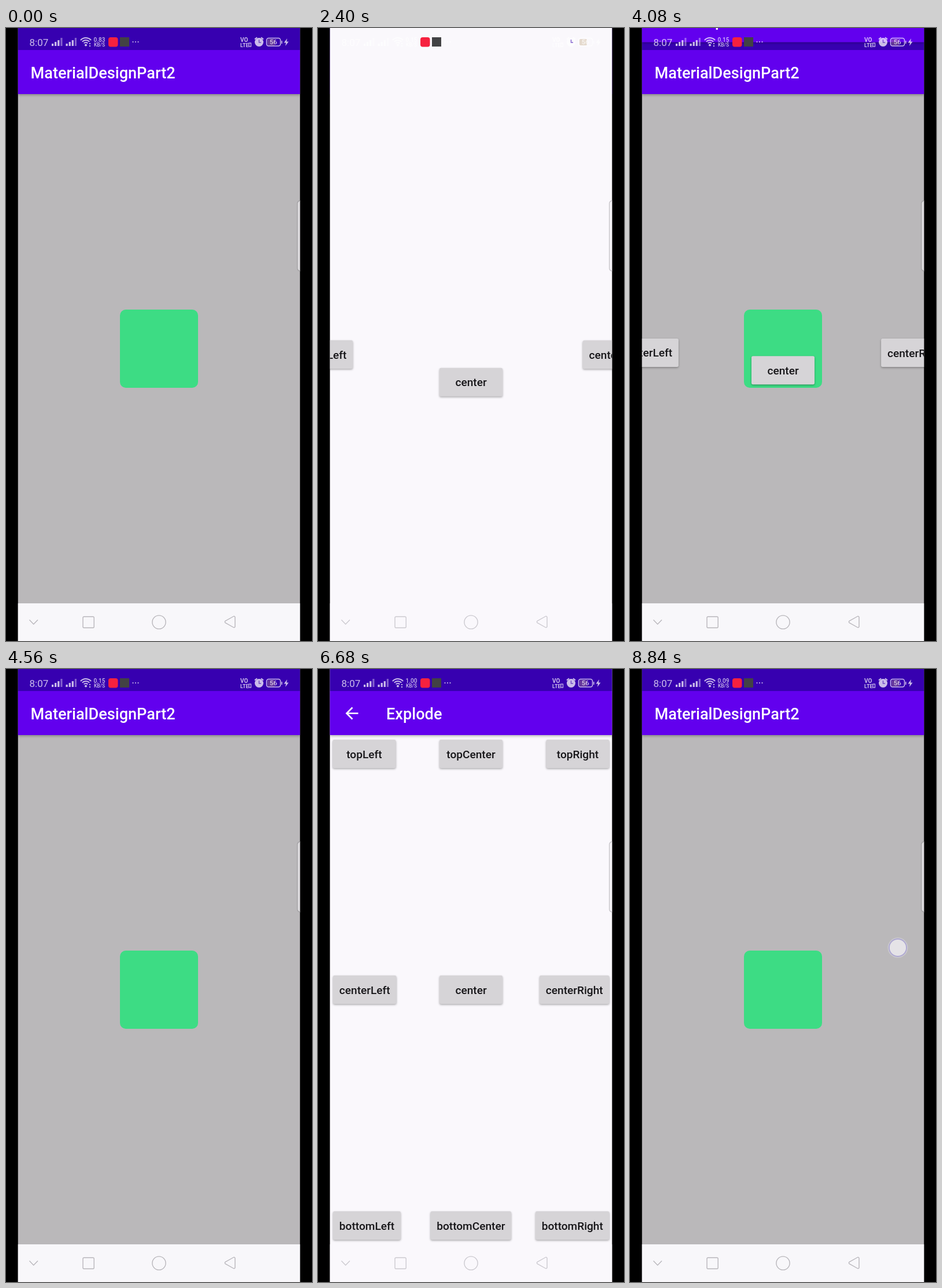
An HTML page with a canvas for the animation above (8.88 s loop, 529 by 1058 pixels).

```html
<!DOCTYPE html>
<html lang="en">
<head>
<meta charset="utf-8">
<title>Explode transition</title>
<style>
  html, body { margin: 0; width: 100%; height: 100%; overflow: hidden; background: #000; }
  canvas { display: block; width: 100vw; height: 100vh; }
</style>
</head>
<body>
<canvas id="stage" width="529" height="1058"></canvas>
<script>
const ctx = document.getElementById('stage').getContext('2d');
const W = 529, H = 1058, LOOP = 8880, STEP = 40;
const LEFT = 20.5, RIGHT = 508.5, BAR = 114, NAV = 993;
const CX = 264.5, CY = H / 2;
const PAPER = '#faf8fc', PURPLE = '#6200ee', DEEP = '#3700b0';
const SANS = 'Roboto, sans-serif';

// Explode: every part travels REACH away from the centre, delayed by its distance.
const DURATION = 740;
const REACH = Math.hypot(RIGHT - LEFT, H) / 2;
const LAST_DELAY = 0.146;
const visits = [{ enter: 1888, leave: 3790 }, { enter: 5535, leave: 7710 }];

const taps = [
  { from: 1520, to: 1640, x: 463, y: 481 },
  { from: 3720, to: 3820, x: 392, y: 1025, back: true },
  { from: 5240, to: 5360, x: 463, y: 481 },
  { from: 7640, to: 7740, x: 392, y: 1025, back: true },
  { from: 8800, to: LOOP, x: 463, y: 481 }
];

const button = (label, x, y, w) => {
  const dx = x + w / 2 - CX, dy = y + 24.5 - CY, dist = Math.hypot(dx, dy);
  return { label, x, y, w, ux: dx / dist, uy: dy / dist, delay: dist / (REACH * 2) / 3 };
};
const buttons = [
  button('topLeft', 25.5, 122, 109),
  button('topCenter', 210, 122, 109),
  button('topRight', 394.5, 122, 109),
  button('centerLeft', 26, 529, 109.5),
  button('center', 210, 529, 109),
  button('centerRight', 383, 529, 120.5),
  button('bottomLeft', 26, 936, 117),
  button('bottomCenter', 194.5, 936, 139.5),
  button('bottomRight', 376, 936, 127.5)
];

const clamp = v => Math.max(0, Math.min(1, v));
const smooth = v => (1 - Math.cos(Math.PI * clamp(v))) / 2;

function rect(x, y, w, h, color) {
  ctx.fillStyle = color;
  ctx.fillRect(x, y, w, h);
}

function roundPath(x, y, w, h, r) {
  ctx.beginPath();
  ctx.roundRect(x, y, w, h, r);
}

function rounded(x, y, w, h, r, color) {
  roundPath(x, y, w, h, r);
  ctx.fillStyle = color;
  ctx.fill();
}

function disc(x, y, r, color) {
  ctx.beginPath();
  ctx.arc(x, y, r, 0, Math.PI * 2);
  ctx.fillStyle = color;
  ctx.fill();
}

function polyline(points, close) {
  ctx.beginPath();
  points.forEach(([x, y]) => ctx.lineTo(x, y));
  if (close) ctx.closePath();
}

function text(str, x, y, size, color, weight = 500, align = 'left') {
  ctx.font = `${weight} ${size}px ${SANS}`;
  ctx.textAlign = align;
  ctx.fillStyle = color;
  ctx.fillText(str, x, y);
}

function shadowed(blur, dy, alpha, draw) {
  ctx.save();
  ctx.shadowColor = `rgba(0,0,0,${alpha})`;
  ctx.shadowBlur = blur;
  ctx.shadowOffsetY = dy;
  draw();
  ctx.restore();
}

function clipped(x, y, w, h, draw) {
  ctx.save();
  ctx.beginPath();
  ctx.rect(x, y, w, h);
  ctx.clip();
  draw();
  ctx.restore();
}

function appBar(y) {
  shadowed(4, 1.5, 0.28, () => rect(LEFT, y + 38, RIGHT - LEFT, BAR - 38, PURPLE));
  rect(LEFT, y, RIGHT - LEFT, 38, DEEP);
}

function drawMain() {
  rect(LEFT, 0, RIGHT - LEFT, H, '#bab8ba');
  appBar(0);
  text('MaterialDesignPart2', 42.5, 86.5, 27.1, '#fff');
  rounded(197, 486, 135, 135, 10, '#3ddc84');
  rect(LEFT, NAV, RIGHT - LEFT, H - NAV, '#f8f7fa');
}

function offset(visit, delay, t) {
  if (t < visit.leave) {
    const u = clamp((t - visit.enter) / DURATION - delay);
    return REACH * (1 - u) ** 2;
  }
  const u = clamp((t - visit.leave) / DURATION - (LAST_DELAY - delay));
  return REACH * u ** 2;
}

function coverage(visit, t) {
  return t < visit.leave
    ? smooth((t - visit.enter - 22) / 225)
    : 1 - smooth((t - visit.leave) / 220);
}

function drawButton(b, d) {
  const x = b.x + b.ux * d, y = b.y + b.uy * d;
  shadowed(3.5, 1.5, 0.32, () => rounded(x, y, b.w, 49, 2.7, '#d6d4d7'));
  text(b.label, x + b.w / 2, y + 31.5, 19.1, '#161518', 500, 'center');
}

function drawExplode(visit, t) {
  ctx.globalAlpha = coverage(visit, t);
  rect(LEFT, 0, RIGHT - LEFT, H, PAPER);
  ctx.globalAlpha = 1;

  clipped(LEFT, BAR, RIGHT - LEFT, NAV - BAR, () =>
    buttons.forEach(b => drawButton(b, offset(visit, b.delay, t))));

  const y = -offset(visit, LAST_DELAY, t);
  appBar(y);
  ctx.strokeStyle = '#fff';
  ctx.lineWidth = 2.7;
  polyline([[69.5, y + 76.5], [50, y + 76.5]]);
  ctx.stroke();
  polyline([[59.5, y + 66.5], [49.5, y + 76.5], [59.5, y + 86.5]]);
  ctx.stroke();
  text('Explode', 118, y + 86.5, 27.1, '#fff');
}

function drawSignal(x, ink) {
  [4, 7, 10, 14].forEach((h, i) => {
    ctx.globalAlpha = i < 3 ? 1 : 0.5;
    rect(x + i * 5.1, 31 - h, 3.2, h, ink);
  });
  ctx.globalAlpha = 1;
}

function drawStatus(t) {
  const ink = 'rgba(255,255,255,0.74)';
  const speed = t < 1960 ? '0.83' : t < 5260 ? '0.15' : t < 8560 ? '1.00' : '0.09';
  text('8:07', 40.5, 30.5, 17, ink, 400);
  drawSignal(79, ink);
  drawSignal(103.5, ink);

  ctx.strokeStyle = ink;
  ctx.lineWidth = 2;
  [4.5, 8.5, 12.5].forEach(r => {
    ctx.beginPath();
    ctx.arc(138, 29.5, r, -Math.PI * 0.76, -Math.PI * 0.24);
    ctx.stroke();
  });
  disc(138, 29.5, 2, ink);
  rect(144, 26, 2, 2, ink);
  rect(144, 30, 2, 2, ink);

  text(speed, 161.5, 23.5, 10, ink, 500, 'center');
  text('KB/S', 161.5, 31.5, 8.5, ink, 500, 'center');
  rounded(177, 16, 16.5, 16.5, 4, '#f6213f');
  rect(197, 16, 16, 16, '#424244');
  [219.5, 224, 228.5].forEach(x => disc(x, 24, 1.1, ink));

  text('VO', 405, 23.5, 10, ink, 700);
  text('LTE', 405, 32.5, 9, ink, 700);
  ctx.lineWidth = 1.2;
  ctx.strokeRect(420, 26, 3.5, 6);

  disc(437.5, 24.5, 7.5, ink);
  ctx.lineWidth = 2;
  polyline([[430, 19.5], [434, 16.2]]);
  ctx.stroke();
  polyline([[445, 19.5], [441, 16.2]]);
  ctx.stroke();
  ctx.strokeStyle = 'rgba(55,0,176,0.6)';
  ctx.lineWidth = 1.5;
  polyline([[437.5, 20], [437.5, 25], [441, 25]]);
  ctx.stroke();

  ctx.strokeStyle = ink;
  rounded(452, 19, 13, 11, 2, 'rgba(190,160,120,0.35)');
  roundPath(450.5, 17.5, 24, 13.5, 3.5);
  ctx.stroke();
  rect(476, 22, 1.5, 5, ink);
  text('56', 462.3, 28.4, 11.5, ink, 500, 'center');
  polyline([[486, 18], [480.5, 25.5], [484, 25.5], [483, 31], [488.5, 23.5], [485, 23.5]], true);
  ctx.fillStyle = ink;
  ctx.fill();
}

function drawBackRipple(tap, t) {
  const fade = 1 - clamp((t - tap.to) / 200);
  if (t < tap.from || fade === 0) return;
  ctx.globalAlpha = fade;
  rounded(360, NAV, 53, H - NAV, 26, '#e6e5e8');
  ctx.globalAlpha = 1;
}

function drawNav(cover) {
  ctx.strokeStyle = cover > 0.6 ? '#cccad0' : '#b9b7bc';
  ctx.lineWidth = 1.4;
  ctx.lineJoin = 'round';
  polyline([[40.5, 1021.5], [47.7, 1029], [55, 1021.5]]);
  ctx.stroke();
  roundPath(133, 1016, 19.2, 19.2, 2);
  ctx.stroke();
  ctx.beginPath();
  ctx.arc(CX, 1025.5, 11.6, 0, Math.PI * 2);
  ctx.stroke();
  ctx.beginPath();
  ctx.moveTo(396, 1025);
  [[396, 1036], [376.5, 1025], [396, 1014], [396, 1025]].forEach(([x, y], i, all) => {
    const next = all[i + 1];
    if (next) ctx.arcTo(x, y, next[0], next[1], 1.8);
  });
  ctx.closePath();
  ctx.stroke();
  ctx.lineJoin = 'miter';
}

function drawHandle(cover) {
  clipped(LEFT, 290, RIGHT - LEFT, 140, () => {
    roundPath(503.7, 298, 14, 121.5, 5);
    ctx.fillStyle = cover > 0.5 ? '#f7f5f9' : '#dddbde';
    ctx.fill();
    ctx.strokeStyle = cover > 0.5 ? '#c6c4c8' : '#a19fa2';
    ctx.lineWidth = 1.3;
    ctx.stroke();
  });
}

function drawTap(tap, t) {
  const fade = 1 - clamp((t - tap.to) / 80);
  if (t < tap.from || fade === 0) return;
  ctx.globalAlpha = fade;
  disc(tap.x, tap.y, 17.5, 'rgba(225,222,235,0.4)');
  disc(tap.x, tap.y, 15, tap.back ? 'rgba(240,239,243,0.75)' : '#e5e3e7');
  ctx.beginPath();
  ctx.arc(tap.x, tap.y, 15, 0, Math.PI * 2);
  ctx.strokeStyle = '#aea8d2';
  ctx.lineWidth = 1.8;
  ctx.stroke();
  ctx.globalAlpha = 1;
}

function draw(t) {
  rect(0, 0, W, H, '#000');
  const visit = visits.find(v => t >= v.enter && t < v.leave + DURATION * (1 + LAST_DELAY));
  const cover = visit ? coverage(visit, t) : 0;

  clipped(LEFT, 0, RIGHT - LEFT, H, () => {
    drawMain();
    if (visit) drawExplode(visit, t);
    drawStatus(t);
    taps.filter(tap => tap.back).forEach(tap => drawBackRipple(tap, t));
    drawNav(cover);
    drawHandle(cover);
    taps.forEach(tap => drawTap(tap, t));
  });
}

function tick() {
  const t = performance.now() % LOOP;
  draw(Math.floor(t / STEP) * STEP);
  requestAnimationFrame(tick);
}
tick();
</script>
</body>
</html>
```
